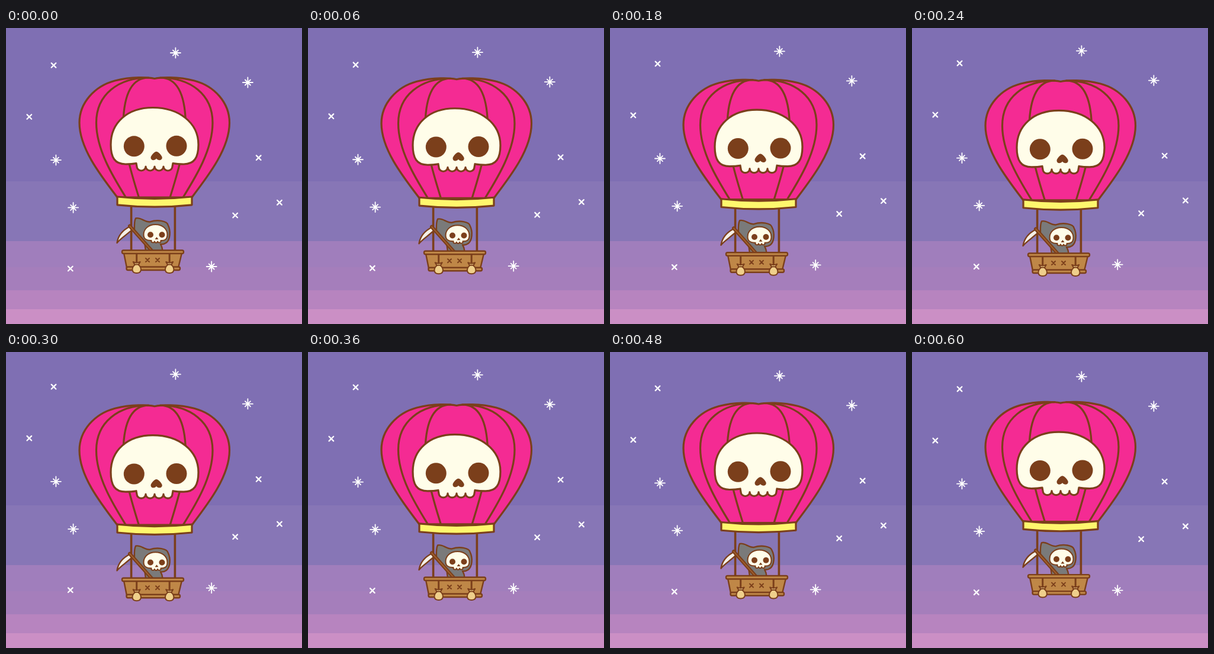
These frames come from a looping animation (500 px wide and 500 px high, 660 ms). An HTML page:

```html
<!DOCTYPE html>
<html lang="en">
<head>
<meta charset="utf-8">
<title>Balloon ride</title>
<style>
html, body { margin: 0; height: 100%; overflow: hidden; background: #7f6fb3; }
svg { display: block; width: 100vw; height: 100vh; }
.line { fill: none; }
.dark { fill: #7b3f1b; stroke: none; }
.bone { fill: #fffde9; }
.wood { fill: #bf8747; }
</style>
</head>
<body>
<svg viewBox="0 0 500 500">
  <defs>
    <path id="rib" d="M241 84C190 84 152.5 112 152.5 160C152.5 205 180 250 203 287M241 84C208 84 199 122 198 160C198 200 212.5 248 225 288"/>
    <g id="bag">
      <path d="M0 382V395" stroke-width="3"/>
      <path d="M-6 395Q0 398 6 395L3 400C9 405 9 414 0 414C-9 414 -9 405 -3 400Z" fill="#efcf8b"/>
      <path d="M-3.5 399.5H3.5"/>
    </g>
  </defs>
  <g id="sky"></g>
  <g id="stars" stroke="#fff" stroke-linecap="round" fill="none"></g>

  <g id="balloon" stroke="#7b3f1b" stroke-width="3.2" stroke-linejoin="round" stroke-linecap="round">
    <path d="M251 85.500C262 83 290 82 318 89C352 98 377.500 126 377.500 160C377.500 203 343 248 314 286H188C159 248 124 203 124 160C124 126 150 98 184 89C212 82 240 83 251 85.500Z" fill="#f42b93"/>
    <use href="#rib" class="line"/>
    <use href="#rib" class="line" transform="matrix(-1 0 0 1 501.5 0)"/>
    <path class="bone" d="M248 134.500C292 134.500 325 160 325 197C325 219 318 230 300 230C292 230 287 229.500 282 228.500L281 234a7.500 7 0 0 1-15 0a7.500 7 0 0 1-15 0a7.500 7 0 0 1-15 0a7.500 7 0 0 1-15 0L220 228.500C215 229.500 210 230 202 230C184 230 177 219 177 197C177 160 205 134.500 248 134.500Z"/>
    <g class="dark">
      <circle cx="216.300" cy="199.800" r="17.500"/>
      <circle cx="288" cy="199.300" r="17.500"/>
      <path d="M254 208.700C257 208.700 263.800 215.500 263.800 219C263.800 224 257 224.500 254 220.500C251 224.500 244.500 224 244.500 219C244.500 215.500 251 208.700 254 208.700Z"/>
    </g>
    <path d="M211.600 300V377M285.400 300V377" stroke-width="3.600"/>
    <path d="M188 285Q251 292 314 285V298.800Q251 305.500 188 298.800Z" fill="#fff76d"/>

    <g stroke-width="2.400">
      <path d="M219 321.500C227 319 234 328 243 327.500C256 323 272 326 273.500 332.500C279 343 277 358 271 362.500Q266 366 261 365Q264 370 264.500 376H236L234 362L217 344C217 336 216 327 219 321.500Z" fill="#7a7a7a"/>
      <path class="bone" d="M252.500 332C265 332 272.500 340 272.500 349C272.500 357 268 359.500 261.500 359a2.700 2.700 0 0 1-5.300 1.500a2.700 2.700 0 0 1-5.300 0a2.700 2.700 0 0 1-5.300-1.500C237 359.500 232.500 356 232.500 349C232.500 340 240 332 252.500 332Z" stroke-width="2"/>
      <g class="dark">
        <circle cx="244" cy="349.300" r="5"/>
        <circle cx="263.500" cy="349.300" r="5"/>
        <path d="M254.500 353L257.500 357H251.500Z"/>
      </g>
      <path d="M209 335.500C198 341 189.500 350 187.500 363C193 356 203 350 212 341.500Z" fill="#f4f0e8"/>
      <path d="M209 334.500L246 376" stroke-width="6"/>
      <path d="M209 334.500L246 376" stroke="#a2622f" stroke-width="1.800"/>
    </g>

    <g stroke-width="2.400">
      <path class="wood" d="M199 380H297L291 405H204Z"/>
      <rect class="wood" x="203.500" y="403.500" width="90.500" height="5.500" rx="2.500"/>
      <rect class="wood" x="196" y="375.500" width="104" height="5.500" rx="2.500"/>
      <path d="M236 389l6 6m0-6l-6 6M253 389l6 6m0-6l-6 6" stroke-width="2"/>
      <g stroke-width="2">
        <use href="#bag" x="220.700"/>
        <use href="#bag" x="276.200"/>
      </g>
    </g>
  </g>
</svg>
<script>
const $ = id => document.getElementById(id);

const bands = [[0, '#7f6fb3'], [259, '#8776b6'], [360, '#a07ebc'], [404, '#a57ebb'], [443, '#b784bf'], [475, '#cb8fc5']];
$('sky').innerHTML = bands.map(([y, c]) => `<rect y="${y}" width="500" height="${500 - y}" fill="${c}"/>`).join('');

const bursts = [[286.4, 42], [408.4, 92], [84.4, 223.1], [113.6, 303.4], [347.2, 403]];
const crosses = [[80.5, 63], [39.3, 150], [426.7, 219.2], [462, 294.8], [387.2, 316.5], [108.8, 406.5]];
const mark = (list, d, width) => list.map(([x, y]) =>
  `<path transform="translate(${x} ${y})" d="${d}" stroke-width="${width}"/>`).join('');
$('stars').innerHTML =
  mark(bursts, 'M-8.5 0H8.5M0-8.5V8.5M-4.5-4.5L4.5 4.5M4.5-4.5L-4.5 4.5', 1.8) +
  mark(crosses, 'M-3.8-3.8L3.8 3.8M3.8-3.8L-3.8 3.8', 2.3);

const STEP = 60, STEPS = 11;
const start = performance.now();

function draw(now) {
  const k = Math.floor(Math.max(0, now - start) / STEP) % STEPS;
  // Sink for five steps, rise again, and ease out on the last one.
  const drift = k < 10 ? 1 - Math.abs(k - 5) / 5 : 0.1;
  $('balloon').setAttribute('transform', `translate(0 ${6.2 * drift})`);
  $('stars').setAttribute('transform', `translate(0 ${-4.3 * drift})`);
  requestAnimationFrame(draw);
}
draw(start);
</script>
</body>
</html>
```
